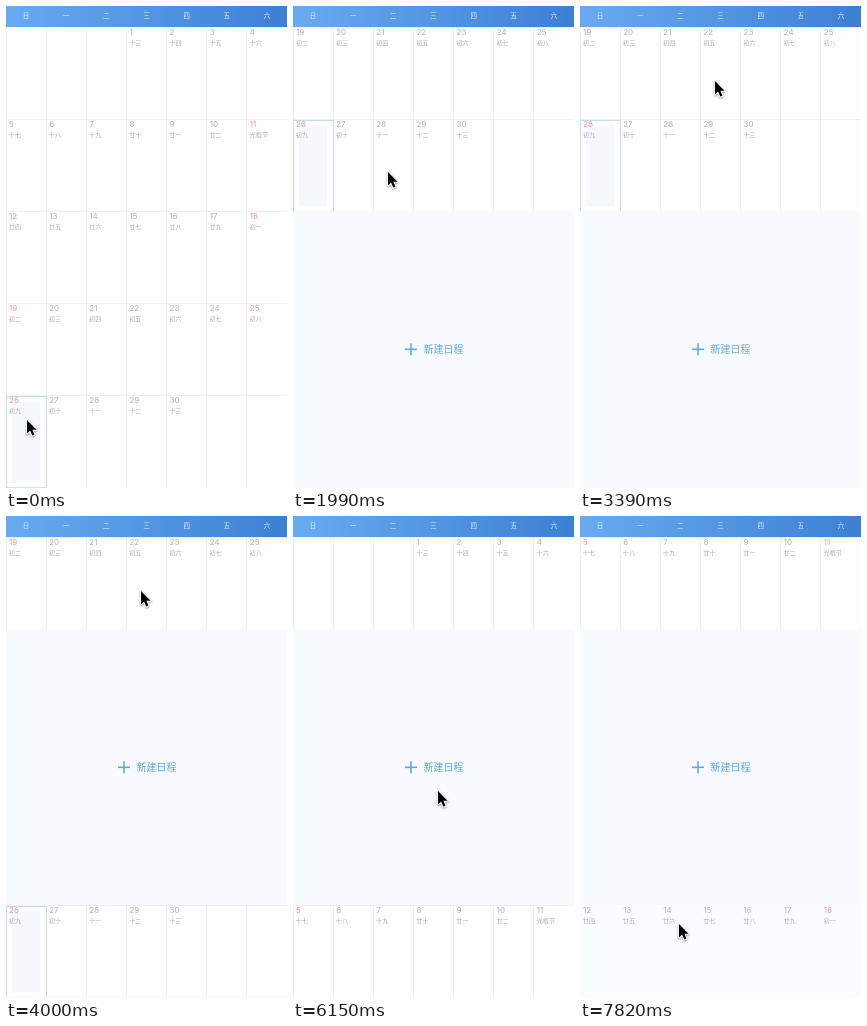
Recreate the animation shown at these times as an HTML page with a canvas. Size 281 by 482 pixels, loop 8000 ms.

```html
<!DOCTYPE html>
<html lang="zh">
<head>
<meta charset="utf-8">
<style>
  html, body { margin: 0; width: 281px; height: 482px; overflow: hidden; }
  canvas { display: block; }
</style>
</head>
<body>
<canvas id="stage" width="281" height="482"></canvas>
<script>
const W = 281, H = 482, LOOP = 8000;
const HEADER = 21, ROW = (H - HEADER) / 5, COL = W / 7;
const PANEL_ROWS = 3, FIRST_COL = 3, DAYS = 30;
const CJK = '"Noto Sans CJK SC", "Noto Sans CJK", sans-serif';
const LATIN = 'Inter, "Liberation Sans", sans-serif';
const PANEL = '#f7fbff', BLUE = '#5fa9e8', LINE = '#eff0f2';
const ctx = document.getElementById('stage').getContext('2d');
const arrow = new Path2D('M0 0V13.5L3.1 10.6L5.3 15.6L7.5 14.7L5.4 9.8H9.6Z');

// Row whose panel is open after each tap (-1: none)
const SLIDE = 300;
const taps = [
  { at: -SLIDE, row: -1 },
  { at: 190, row: 4 },
  { at: 3655, row: 3 },
  { at: 4670, row: -1 },
  { at: 5750, row: 0 },
  { at: 6840, row: 1 }
];

// Pointer stops; each move starts at `at` and takes MOVE ms.
const MOVE = 250;
const stops = [
  { at: -MOVE, x: 20, y: 413 },
  { at: 490, x: 52, y: 224 },
  { at: 800, x: 47, y: 165 },
  { at: 1380, x: 94, y: 165 },
  { at: 2350, x: 135, y: 164 },
  { at: 2880, x: 134, y: 74 },
  { at: 4850, x: 151, y: 172 },
  { at: 5130, x: 150, y: 78 },
  { at: 5900, x: 144, y: 274 },
  { at: 6310, x: 115, y: 420 },
  { at: 7400, x: 98, y: 407 }
];

const clamp = v => Math.max(0, Math.min(1, v));
const ease = v => v * v * (3 - 2 * v);
const mix = (a, b, p) => a + (b - a) * p;

// The latest key, the one before it, and the eased progress between them
function segment(keys, t, duration) {
  const i = keys.findLastIndex(k => k.at <= t);
  const to = keys[i], from = keys[Math.max(0, i - 1)];
  return { from, to, p: ease(clamp((t - to.at) / duration)) };
}

function lunarName(day) {
  const n = (day + 11) % 29 + 1;
  if (day === 11) return '光棍节';
  const prefix = n <= 10 ? '初' : n < 20 ? '十' : '廿';
  return prefix + '十一二三四五六七八九'[n % 10];
}

// Row top, counted in rows
function slot(i, open) {
  if (open < 0) return i;
  return i - Math.min(open, PANEL_ROWS) + (i > open ? PANEL_ROWS : 0);
}

function rect(x, y, w, h, color) {
  ctx.fillStyle = color;
  ctx.fillRect(x, y, w, h);
}

function text(str, x, y, font, color, align = 'left') {
  ctx.font = font;
  ctx.fillStyle = color;
  ctx.textAlign = align;
  ctx.fillText(str, x, y);
}

function drawHeader() {
  const g = ctx.createLinearGradient(0, 0, W, 0);
  g.addColorStop(0, '#68abf1');
  g.addColorStop(1, '#3c80d2');
  rect(0, 0, W, HEADER, g);
  [...'日一二三四五六'].forEach((d, i) =>
    text(d, (i + .5) * COL, 11.5, `6.5px ${CJK}`, '#e8f2fd', 'center'));
}

function drawRow(i, y, fade) {
  rect(0, y, W, ROW + 1, PANEL);
  ctx.globalAlpha = 1 - fade * .7;
  rect(0, y, W, ROW + 1, '#fefefe');
  ctx.globalAlpha = 1 - fade;
  if (i) rect(0, y, W, 1, LINE);
  for (let c = 0; c < 7; c++) rect(Math.floor(c * COL), y, 1, ROW + 1, LINE);
  ctx.globalAlpha = 1;

  if (i === 4) {
    rect(6, y + 7, 28, 80, '#f5f9fd');
    ctx.strokeStyle = '#c3ddee';
    ctx.lineWidth = 1;
    ctx.strokeRect(.5, y + 1.5, 40, ROW - 1);
  }
  for (let c = 0; c < 7; c++) {
    const day = i * 7 + c - FIRST_COL + 1;
    if (day < 1 || day > DAYS) continue;
    const x = c * COL + 3, weekend = c % 6 === 0;
    text(day, x, y + 8, `8px ${LATIN}`, weekend ? '#e39aa2' : '#b2b2b5');
    text(lunarName(day), x - .3, y + 18, `6.2px ${CJK}`, '#aeaeb0');
  }
}

function drawPanel(top, bottom) {
  if (bottom <= top) return;
  const mid = top + ROW * PANEL_ROWS / 2;
  ctx.save();
  ctx.beginPath();
  ctx.rect(0, top, W, bottom - top);
  ctx.clip();
  rect(0, top, W, bottom - top, PANEL);
  rect(112, mid - .8, 12, 1.6, BLUE);
  rect(117.2, mid - 6, 1.6, 12, BLUE);
  text('新建日程', 130.5, mid + 4, `10px ${CJK}`, BLUE);
  ctx.restore();
}

function drawPointer(t) {
  const { from, to, p } = segment(stops, t, MOVE);
  ctx.save();
  ctx.translate(mix(from.x, to.x, p) + 1, mix(from.y, to.y, p) + 1);
  ctx.lineJoin = 'round';
  ctx.lineWidth = 2;
  ctx.strokeStyle = '#fff';
  ctx.shadowColor = 'rgba(0, 0, 0, .4)';
  ctx.shadowBlur = 2;
  ctx.shadowOffsetY = 1;
  ctx.stroke(arrow);
  ctx.shadowColor = 'transparent';
  ctx.fillStyle = '#000';
  ctx.fill(arrow);
  ctx.restore();
}

function draw(t) {
  const { from, to, p } = segment(taps, t, SLIDE);
  const rowTop = i =>
    Math.floor(HEADER + ROW * mix(slot(i, from.row), slot(i, to.row), p));

  rect(0, 0, W, H, PANEL);
  for (let i = 0; i < 5; i++) {
    const fading = to.row === 1 && i === to.row + 1;
    drawRow(i, rowTop(i), fading ? p : 0);
  }
  for (const row of new Set([from.row, to.row])) {
    if (row < 0) continue;
    drawPanel(Math.round(rowTop(row) + ROW), row === 4 ? H : rowTop(row + 1));
  }
  drawHeader();
  drawPointer(t);
}

function frame() {
  draw(performance.now() % LOOP);
  requestAnimationFrame(frame);
}
frame();
</script>
</body>
</html>
```
